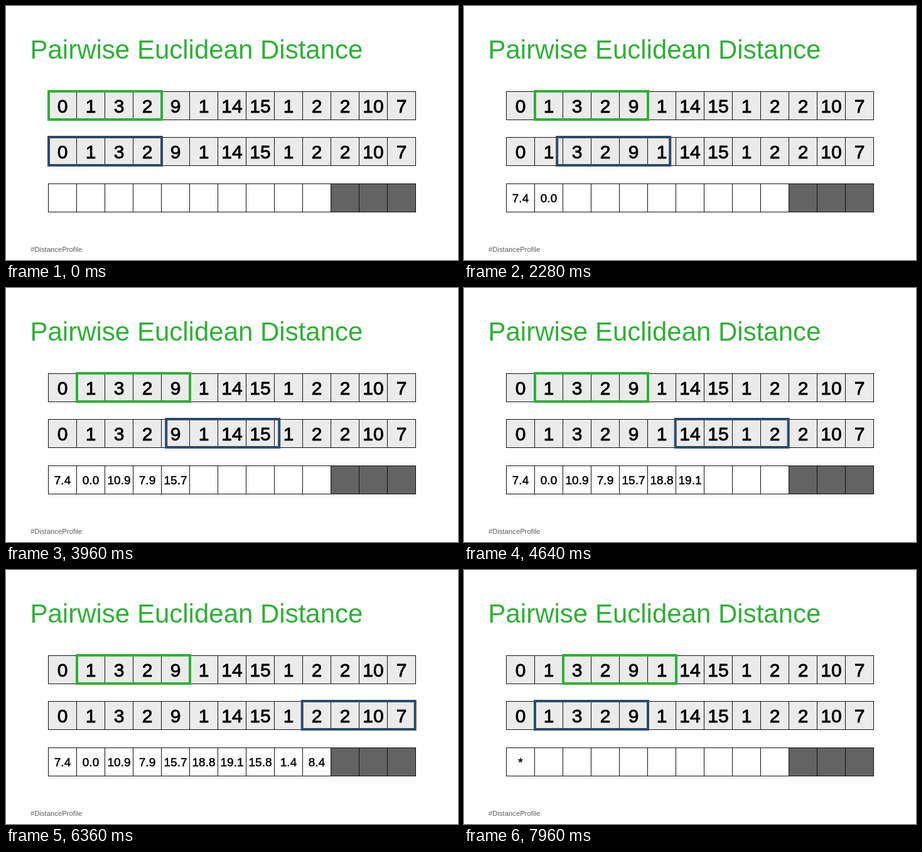
An HTML page with a canvas for the animation above (8 s loop, 720 by 405 pixels).

```html
<!DOCTYPE html>
<html lang="en">
<head>
<meta charset="utf-8">
<title>Pairwise Euclidean Distance</title>
<style>
  html, body { margin: 0; width: 100%; height: 100%; overflow: hidden; background: #fff; }
  canvas { display: block; }
</style>
</head>
<body>
<canvas id="stage" width="720" height="405"></canvas>
<script>
const ctx = document.getElementById('stage').getContext('2d');
const LOOP = 8000, TICK = 40;
const LEFT = 67.5, CELL = 45, WINDOW = 4;
const ROWS = { query: 136.5, series: 209.5, result: 283.5 };
const GREEN = '#2db135', BLUE = '#2d4b69', LIGHT = '#ebebeb', DARK = '#636363';
const FONT = '"Liberation Sans", Arial, sans-serif';

const series = [0, 1, 3, 2, 9, 1, 14, 15, 1, 2, 2, 10, 7];
const profileLength = series.length - WINDOW + 1;

function distance(a, b) {
  let sum = 0;
  for (let i = 0; i < WINDOW; i++) sum += (series[a + i] - series[b + i]) ** 2;
  return Math.sqrt(sum).toFixed(1);
}
const profile = Array.from({ length: profileLength }, (_, j) => distance(1, j));

// Moves of the lower window: start time and number of ticks
const slides = [
  [1640, 4], [2240, 3], [2800, 3], [3400, 3], [3960, 3],
  [4520, 4], [5120, 3], [5680, 3], [6280, 3]
];
const FIRST_VALUE = 1160, SUMMARY = 6840, CLEAR = 7320;
const ADVANCE = [520, 5], NEXT = [7800, 5];

const endOf = ([start, ticks]) => start + (ticks - 1) * TICK;

function ease(p) {
  const power = 2.4;
  return p < 0.5 ? (2 * p) ** power / 2 : 1 - (2 - 2 * p) ** power / 2;
}

function progress(t, [start, ticks]) {
  const p = (t - start + TICK) / (ticks * TICK);
  return t < start ? 0 : ease(Math.min(p, 1));
}

// The lower window rests slightly left of the grid while it slides
const restX = k => k ? k * CELL - 1.3 : 0;

function stateAt(t) {
  const state = {
    green: CELL * (progress(t, ADVANCE) + progress(t, NEXT)),
    blue: 0, values: [], tag: '#DistanceProfile'
  };
  if (t >= CLEAR) {
    state.blue = CELL * progress(t, NEXT);
    if (t >= endOf(NEXT)) state.values = ['*'];
  } else if (t >= SUMMARY) {
    state.blue = 8 * CELL;
    state.values = [profile[0], profile[8]];
    state.tag = '#MatrixProfile';
  } else {
    let count = t >= FIRST_VALUE ? 1 : 0;
    slides.forEach((slide, k) => {
      state.blue += (restX(k + 1) - restX(k)) * progress(t, slide);
      if (t >= endOf(slide)) count++;
    });
    state.values = profile.slice(0, count);
  }
  return state;
}

function text(str, x, y, size, color, align = 'left', weight = 0) {
  ctx.font = `${size}px ${FONT}`;
  ctx.textAlign = align;
  ctx.fillStyle = color;
  ctx.fillText(str, x, y);
  if (weight) {
    ctx.strokeStyle = color;
    ctx.lineWidth = weight;
    ctx.lineJoin = 'round';
    ctx.strokeText(str, x, y);
  }
}

function cells(y, fill) {
  ctx.lineWidth = 1;
  ctx.lineJoin = 'miter';
  ctx.strokeStyle = '#111';
  series.forEach((_, i) => {
    ctx.fillStyle = fill(i);
    ctx.fillRect(LEFT + i * CELL, y, CELL, CELL);
  });
  series.forEach((_, i) => ctx.strokeRect(LEFT + i * CELL, y, CELL, CELL));
}

function labels(values, baseline, size, weight) {
  values.forEach((v, i) =>
    text(v, LEFT + (i + 0.5) * CELL, baseline, size, '#000', 'center', weight));
}

function frame(x, y, color) {
  ctx.lineWidth = 4;
  ctx.lineJoin = 'miter';
  ctx.strokeStyle = color;
  ctx.strokeRect(LEFT + 0.5 + x, y - 0.5, WINDOW * CELL, CELL);
}

function draw(t) {
  const state = stateAt(t);
  ctx.fillStyle = '#fff';
  ctx.fillRect(0, 0, 720, 405);
  text('Pairwise Euclidean Distance', 38.5, 83.5, 42, GREEN);

  for (const y of [ROWS.query, ROWS.series]) {
    cells(y, () => LIGHT);
    labels(series, y + 33.5, 30, 0.9);
  }
  cells(ROWS.result, i => i < profileLength ? '#fff' : DARK);
  labels(state.values, ROWS.result + 29.5, 19, 0.5);

  frame(state.green, ROWS.query, GREEN);
  frame(state.blue, ROWS.series, BLUE);
  text(state.tag, 39, 392, 11.3, '#5e5e5e');
}

const origin = performance.now();
function tick() {
  const t = (performance.now() - origin) % LOOP;
  draw(Math.floor(t / TICK) * TICK);
  requestAnimationFrame(tick);
}
tick();
</script>
</body>
</html>
```
